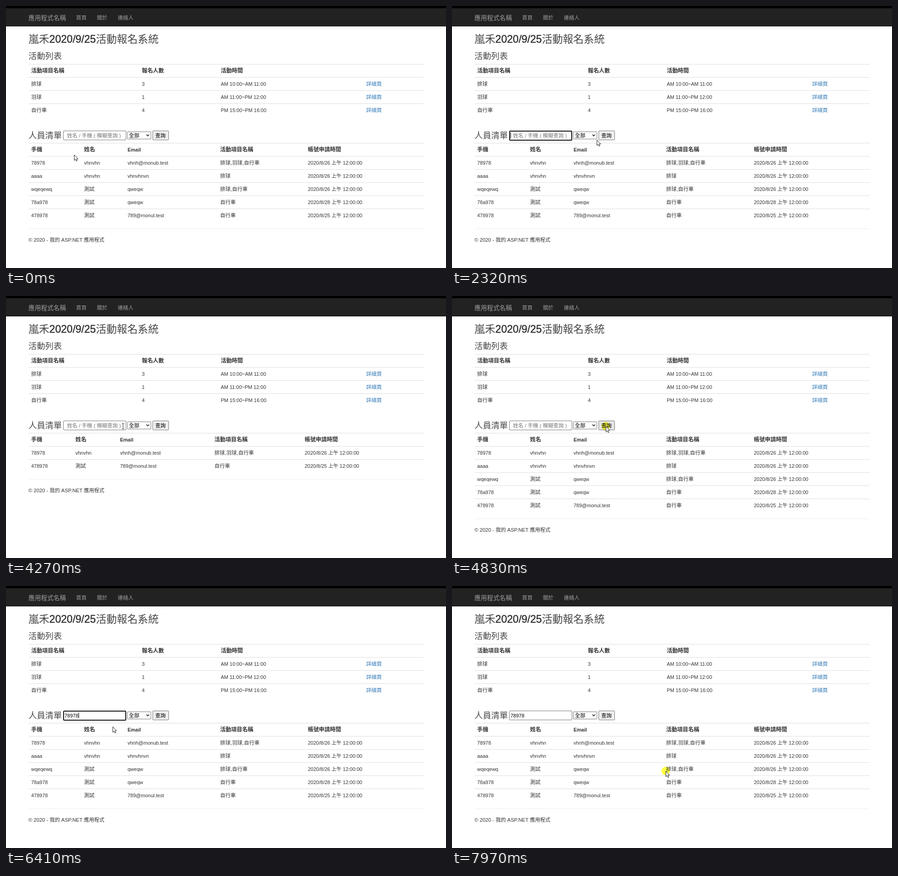
Write an HTML page that moves like this. It is 970x578 px and loops after 8 s.

```html
<!DOCTYPE html>
<html lang="zh-Hant">
<head>
<meta charset="utf-8">
<style>
  html, body { margin: 0; width: 100%; height: 100%; overflow: hidden; background: #fff; }
  svg { display: block; }
  text {
    font-family: "Liberation Sans", "Noto Sans CJK TC", "Noto Sans CJK", sans-serif;
    font-weight: 300;
    fill: #333;
  }
  .bold { font-weight: 700; }
  .title { fill: #484848; }
  .title tspan { fill: #333; stroke: #333; stroke-width: .5; }
  .nav { fill: #9d9d9d; }
  .link { fill: #337ab7; }
  .hint { fill: #757575; }
  .dark { fill: #000; }
  .selected { fill: #fff; }
  .halo { fill: #ffff45; mix-blend-mode: multiply; }
</style>
</head>
<body>
<svg id="stage" width="970" height="578" viewBox="0 0 970 578"></svg>
<script>
const LOOP = 8000, STEP = 92.7, ROW = 29, CLICK = 2 * STEP;
const QUERY = '78978';

const activities = [
  ['排球', '3', 'AM 10:00~AM 11:00'],
  ['羽球', '1', 'AM 11:00~PM 12:00'],
  ['自行車', '4', 'PM 15:00~PM 16:00'],
];
const people = [
  [QUERY, 'vhnvhn', 'vhnh@monub.test', '排球,羽球,自行車', '2020/8/26'],
  ['aaaa', 'vhnvhn', 'vhnvhnvn', '排球', '2020/8/26'],
  ['wqeqewq', '測試', 'qweqw', '排球,自行車', '2020/8/26'],
  ['78a978', '測試', 'qweqw', '自行車', '2020/8/28'],
  ['478978', '測試', '789@monul.test', '自行車', '2020/8/25'],
].map(row => [...row.slice(0, 4), row[4] + ' 上午 12:00:00']);

const time = {
  mark: 1015, focus: 1850, paste: 2780, search: 3050, results: 3430,
  searchAll: 4640, allResults: 4725, refocus: 5280, repaste: 5930, blur: 7870,
};
const button = [339, 287];

// The pointer rests at each place until `leave`, then glides to the next.
const stops = [
  { arrive: 0, leave: 80, at: [150, 328] },
  { arrive: time.mark, leave: 1400, at: [67, 350], click: true },
  { arrive: time.focus, leave: 2000, at: [215, 287], click: true },
  { arrive: 2300, leave: 2600, at: [319, 295] },
  { arrive: time.search, leave: time.results, at: button, click: true },
  { arrive: 4080, leave: 4280, at: [258, 287] },
  { arrive: time.searchAll, leave: 4920, at: button, click: true },
  { arrive: time.refocus, leave: 5290, at: [237, 286], click: true },
  { arrive: 5375, leave: 5745, at: [262, 324] },
  { arrive: 6025, leave: 6410, at: [235, 310] },
  { arrive: 6950, leave: 7040, at: [235, 390] },
  { arrive: 7450, leave: 7500, at: [541, 441] },
  { arrive: time.blur, leave: LOOP, at: [471, 408], click: true },
];

const between = (t, from, to = LOOP) => t >= from && t < to;
const ease = k => k * k * (3 - 2 * k);

function pointerAt(t) {
  const i = stops.findLastIndex(stop => stop.arrive <= t);
  const stop = stops[i], next = stops[i + 1];
  const k = next ? ease(Math.max(0, t - stop.leave) / (next.arrive - stop.leave)) : 0;
  const [x, y] = stop.at.map((from, axis) =>
    Math.round(from + (next ? next.at[axis] - from : 0) * k));
  return { x, y, pressed: stop.click && t < Math.min(stop.leave, stop.arrive + CLICK) };
}

function text(x, y, string, cls = '', size) {
  size ??= /[a-z0-9]/i.test(string) ? 11 : cls === 'bold' ? 12.2 : 11.5;
  return `<text x="${x}" y="${y}" font-size="${size}" class="${cls}">${string}</text>`;
}

const rect = (x, y, w, h, fill, extra = '') =>
  `<rect x="${x}" y="${y}" width="${w}" height="${h}" fill="${fill}" ${extra}/>`;

const rule = (y, color = '#ddd') => rect(50, y, 871, 1, color);

function table(top, columns, head, rows) {
  return [head, ...rows].map((cells, r) => {
    const y = top + r * ROW;
    return rule(y) + cells.map((cell, c) =>
      text(columns[c], y + 19, cell, r ? '' : 'bold')).join('');
  }).join('');
}

const page =
  rect(0, 0, 970, 45, '#222') + rect(0, 0, 970, 5, '#000') + rect(0, 44, 970, 1, '#101010') +
  text(49.5, 30.5, '應用程式名稱', 'nav', 13.8) +
  ['首頁', '關於', '連絡人'].map((item, i) => text(154.5 + i * 46, 30, item, 'nav')).join('') +
  text(49.5, 81, '嵐禾<tspan>2020/9/25</tspan>活動報名系統', 'title', 23.05) +
  text(49.5, 117, '活動列表', 'title', 18.4) +
  table(128, [55.5, 299.5, 473.5], ['活動項目名稱', '報名人數', '活動時間'], activities) +
  activities.map((_, i) => text(794, 176 + i * ROW, '詳細頁', 'link')).join('') +
  text(49.5, 291.5, '人員清單', 'title', 18.4);

function peopleList(isFiltered) {
  const rows = isFiltered ? people.filter(row => row[0].includes(QUERY)) : people;
  const columns = isFiltered ? [55.5, 153, 251.5, 459.5, 658.5] : [55.5, 172, 268, 472, 665.5];
  const end = 346 + rows.length * ROW;
  return table(302, columns, ['手機', '姓名', 'Email', '活動項目名稱', '帳號申請時間'], rows) +
    rule(end, '#eee') + text(49.5, end + 29, '© 2020 - 我的 ASP.NET 應用程式', '', 11.3);
}

function searchBar(t, { x, y }) {
  const hasFocus = between(t, time.focus, time.search) || between(t, time.refocus, time.blur);
  const hasValue = between(t, time.paste, time.results) || between(t, time.repaste);
  const hover = x >= 323 && x <= 359 && y >= 275 && y <= 296;
  const caretStart = [time.repaste, time.refocus, time.paste, time.focus].find(start => start <= t);
  const showCaret = hasFocus && (t - caretStart) % 1000 < 500;
  const border = 'stroke="#767676" rx="1.5"';
  return (hasFocus
      ? rect(127, 276, 137, 20, '#fff', 'stroke="#101010" stroke-width="2" rx="1.5"')
      : rect(126.5, 275.5, 138, 20, '#fff', border)) +
    (hasValue ? text(129, 290, QUERY, 'dark') : text(134.5, 290, '姓名 / 手機 ( 模糊查詢 )', 'hint', 11.5)) +
    (showCaret ? rect(hasValue ? 160 : 129, 279, 1, 13, '#000') : '') +
    rect(267.5, 277.5, 52, 16, '#fff', border) + text(271, 290, '全部', 'dark') +
    '<path d="M309.5 283.5l3 3 3-3" fill="none" stroke="#222" stroke-width="1.6"/>' +
    rect(323.5, 275.5, 35, 20, hover ? '#e5e5e5' : '#efefef', border) + text(329, 290, '查詢', 'dark');
}

function drawPointer({ x, y, pressed }) {
  const inInput = x > 127 && x < 264 && y > 276 && y < 296;
  const onPhone = x > 55 && x < 87 && y > 339 && y < 355;
  const shape = inInput || onPhone
    ? '<path d="M-2.5-5.5h2l.5.5.5-.5h2M0-5V5.5M-2.5 6h2l.5-.5.5.5h2" fill="none" stroke="#222"/>'
    : '<path d="M.5.5V12.7L3.2 10.2 5.1 14.3 7 13.4 5.2 9.4H8.8Z" fill="#fff" stroke="#222"/>';
  const halo = pressed ? `<circle class="halo" cx="${x}" cy="${y}" r="9.3"/>` : '';
  return halo + `<g transform="translate(${x} ${y})">${shape}</g>`;
}

function render(t) {
  const pointer = pointerAt(t);
  const selection = between(t, time.mark, time.focus)
    ? rect(56, 338, 31, 16, '#3390ff') + text(55.5, 350, QUERY, 'selected') : '';
  return page + searchBar(t, pointer) + peopleList(between(t, time.results, time.allResults)) +
    selection + drawPointer(pointer);
}

const stage = document.getElementById('stage');
let shown = -1;
function frame() {
  const step = Math.floor(performance.now() % LOOP / STEP);
  if (step !== shown) {
    shown = step;
    stage.innerHTML = render(step * STEP);
  }
  requestAnimationFrame(frame);
}
frame();
</script>
</body>
</html>
```
